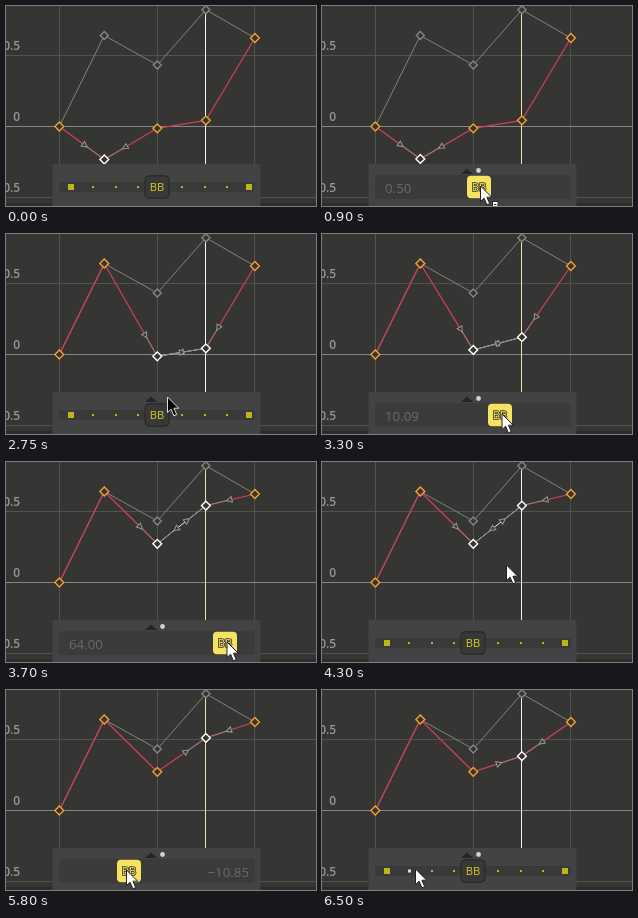
Write an HTML page that moves like this. It is 310 px wide and 200 px high and loops after 7200 ms.

```html
<!DOCTYPE html>
<html lang="en">
<head>
<meta charset="utf-8">
<title>Curve blend slider</title>
<style>
  html, body { margin: 0; width: 100%; height: 100%; overflow: hidden; background: #353533; }
  svg { display: block; width: 310px; height: 200px; }
  text { font-family: "Open Sans", sans-serif; }
  .grid { stroke: #515150; }
  .axis { fill: #969696; font-size: 12px; font-weight: 600; text-anchor: end; }
  .ghost, .arm { stroke: #828282; fill: none; }
  .red { stroke: #d03e5d; stroke-width: 1.25; }
  .key { fill: #353533; stroke-width: 1.4; }
  .tri { fill: #353533; stroke: #999; }
  .dot { fill: #c3b31b; }
  .dot.near { fill: #e8e4b0; }
  .value { fill: #6a6a6a; font-size: 13.3px; }
  .label { font-size: 11.2px; text-anchor: middle; fill: #d9c91f; }
  .face { fill: #383838; stroke: #242424; }
  .time { stroke: #f4f4f4; }
  .dragging .face { fill: #f4e360; stroke: none; }
  .dragging .label { fill: #f4e360; stroke: #3a3828; stroke-width: 1.6; paint-order: stroke; }
  .dragging .time { stroke: #ece2a2; }
</style>
</head>
<body>
<svg id="stage" viewBox="0 0 310 200">
  <rect width="310" height="200" fill="#353533"/>
  <path class="grid" d="M53.5 0V200M151.5 0V200M248.5 0V200M0 49.5H310M0 191.5H310"/>
  <path d="M0 120.5H310" stroke="#858585"/>
  <rect y="197" width="310" height="3" fill="#2e2b2b"/>
  <g class="axis">
    <text x="14.2" y="44.3">0.5</text>
    <text x="14.2" y="115.3">0</text>
    <text x="14.2" y="186.3">-0.5</text>
  </g>
  <path class="time" d="M199.5 0V158"/>
  <g id="graph"></g>

  <rect x="46.5" y="158" width="208" height="42" fill="#434343"/>
  <g id="idle">
    <rect x="53" y="176" width="196" height="10" rx="2" fill="#3a3a3a"/>
    <g id="dots"></g>
  </g>
  <g id="active">
    <rect x="53" y="169" width="196" height="24" rx="3" fill="#3b3b3b"/>
    <text id="value" class="value" y="187"></text>
  </g>
  <path id="arrow" d="M139 168L145 162.5L151 168Z" fill="#252525"/>
  <circle id="pin" cx="156.5" cy="164.5" r="2.4" fill="#d2d2d2"/>
  <g id="button">
    <rect class="face" x="-12" y="169.8" width="24" height="22.4" rx="4"/>
    <text class="label" y="185.3">BB</text>
  </g>
  <g id="cursor">
    <path id="pointer" d="M-.5 0V15.5L3.1 12.2L5.9 18.8L8.7 17.6L5.9 11.2H10.7Z"/>
    <g id="badge">
      <rect x="11.5" y="15.5" width="5.5" height="6.5" fill="#fff" stroke="#222"/>
      <path d="M13 18.5H15.5" stroke="#222"/>
    </g>
  </g>
</svg>
<script>
const LOOP = 7200, STEP = 50, REACH = 85, CENTER = 151, ARM = 24.6, GRAB_Y = 180;
const $ = id => document.getElementById(id);

const xs = [53.3, 98.3, 151.3, 199.9, 248.9];
const startY = [120.5, 153.5, 122.3, 114.3, 32];
const goalY = [120.5, 29.5, 59, 3.8, 32];

// Approach the button, drag it to `off`, leave to `rest`, then sweep a new selection until `done`.
const gestures = [
  { picks: [1], enter: 50, from: [205, 198], press: 700, grab: 153, off: 85, span: 900,
    release: 1900, rest: [136, 100], sweep: 2250, by: [82, 40], lift: 0, done: 2550 },
  { picks: [2, 3], enter: 2750, from: [162, 163], press: 3000, grab: 153.5, off: 68, span: 580,
    release: 3850, rest: [185, 103], sweep: 4300, by: [26, 15], lift: 87, done: 4950 },
  { picks: [3], enter: 5050, from: [205, 124], press: 5400, grab: 149, off: -64, span: 760,
    release: 6250, rest: [94, 179], sweep: LOOP, by: [0, 0], lift: 0, done: LOOP + 1 }
];

const ramp = (t, a, b) => Math.min(1, Math.max(0, (t - a) / (b - a)));
const ease = (t, a, b) => { const u = ramp(t, a, b); return u * u * (3 - 2 * u); };
const mix = (a, b, u) => a.map((v, i) => v + (b[i] - v) * u);
const offsetOf = (g, t) => Math.round(g.off * ease(t, g.press + 50, g.press + 50 + g.span));
const blendOf = off => Math.sign(off) * (off / REACH) ** 2;
const show = (id, on) => $(id).setAttribute("visibility", on ? "visible" : "hidden");

function cursorAt(g, t) {
  if (t < g.press) return mix(g.from, [g.grab, GRAB_Y], ease(t, g.enter, g.press - 100));
  const held = [g.grab + offsetOf(g, t), GRAB_Y];
  const [x, y] = mix(held, g.rest, ease(t, g.release, g.release + 250));
  const u = ease(t, g.sweep, g.done);
  return [x + g.by[0] * u, y + g.by[1] * u - g.lift * Math.sin(Math.PI * u)];
}

function pointsAt(t) {
  const ys = startY.slice();
  for (const g of gestures) {
    const v = blendOf(offsetOf(g, t));
    for (const p of g.picks) ys[p] += (goalY[p] - ys[p]) * v;
  }
  return xs.map((x, i) => [x, ys[i]]);
}

const line = (a, b, attr) => `<path d="M${a}L${b}" ${attr}/>`;
const diamond = ([x, y], color, r = 4.4) =>
  `<path class="key" d="M${x} ${y - r}l${r} ${r}l${-r} ${r}l${-r} ${-r}Z" stroke="${color}"/>`;

function handle(p, q) {
  const a = Math.atan2(q[1] - p[1], q[0] - p[0]);
  const end = [p[0] + ARM * Math.cos(a), p[1] + ARM * Math.sin(a)];
  return line(p, end, 'class="arm"') +
    `<path class="tri" d="M3.4 0L-2 2.8V-2.8Z" transform="translate(${end}) rotate(${a * 180 / Math.PI + 180})"/>`;
}

function graph(t) {
  const pts = pointsAt(t);
  const { picks } = gestures.find(g => t < g.done);
  const has = i => picks.includes(i);
  const ghost = xs.map((x, i) => [x, goalY[i]]);
  let out = `<polyline class="ghost" points="${ghost.join(" ")}"/>`;
  for (let i = 1; i < 4; i++) out += diamond(ghost[i], "#858585", 4);
  for (let i = 0; i < 4; i++)
    out += line(pts[i], pts[i + 1], has(i) && has(i + 1) ? 'stroke="#e8e8e8"' : 'class="red"');
  for (const i of picks) out += handle(pts[i], pts[i - 1]) + handle(pts[i], pts[i + 1]);
  pts.forEach((p, i) => out += diamond(p, has(i) ? "#fff" : "#f3a02c"));
  return out;
}

function dots(cx, hover) {
  let out = "";
  for (let i = -4; i <= 4; i++) {
    if (!i) continue;
    const x = 154 + i * 22.25, end = Math.abs(i) === 4;
    const near = hover && !end && Math.abs(x - cx) < 9;
    const s = end ? 6 : near ? 3 : 2;
    out += `<rect class="dot${near ? " near" : ""}" x="${Math.round(x - s / 2)}" y="${181 - s / 2}" width="${s}" height="${s}"/>`;
  }
  return out;
}

function draw(t) {
  const g = gestures.filter(g => t >= g.enter).pop() || gestures[0];
  const dragging = t >= g.press && t < g.release;
  const off = dragging ? offsetOf(g, t) : 0;
  const [cx, cy] = cursorAt(g, t);
  const seen = t >= g.enter, hover = seen && cy >= 158;

  $("stage").classList.toggle("dragging", dragging);
  $("graph").innerHTML = graph(t);
  $("dots").innerHTML = dots(cx, hover);
  show("idle", !dragging);
  show("active", dragging);
  show("arrow", hover);
  show("pin", hover && cy > 165);

  const value = $("value");
  value.textContent = (blendOf(off) * 100).toFixed(2).replace("-", "\u2212");
  value.setAttribute("x", off < 0 ? 243 : 63);
  value.setAttribute("text-anchor", off < 0 ? "end" : "start");
  $("button").setAttribute("transform", `translate(${CENTER + off})`);

  const dark = hover && t < g.press - 100;
  show("cursor", seen);
  $("cursor").setAttribute("transform", `translate(${cx} ${cy})`);
  $("pointer").setAttribute("fill", dark ? "#000" : "#fff");
  $("pointer").setAttribute("stroke", dark ? "#ddd" : "#222");
  $("badge").setAttribute("display", dragging && g === gestures[0] ? "inline" : "none");
}

let last = -1;
const begin = performance.now();
function tick() {
  const t = Math.floor((performance.now() - begin) % LOOP / STEP) * STEP;
  if (t !== last) draw(last = t);
  requestAnimationFrame(tick);
}
tick();
</script>
</body>
</html>
```
